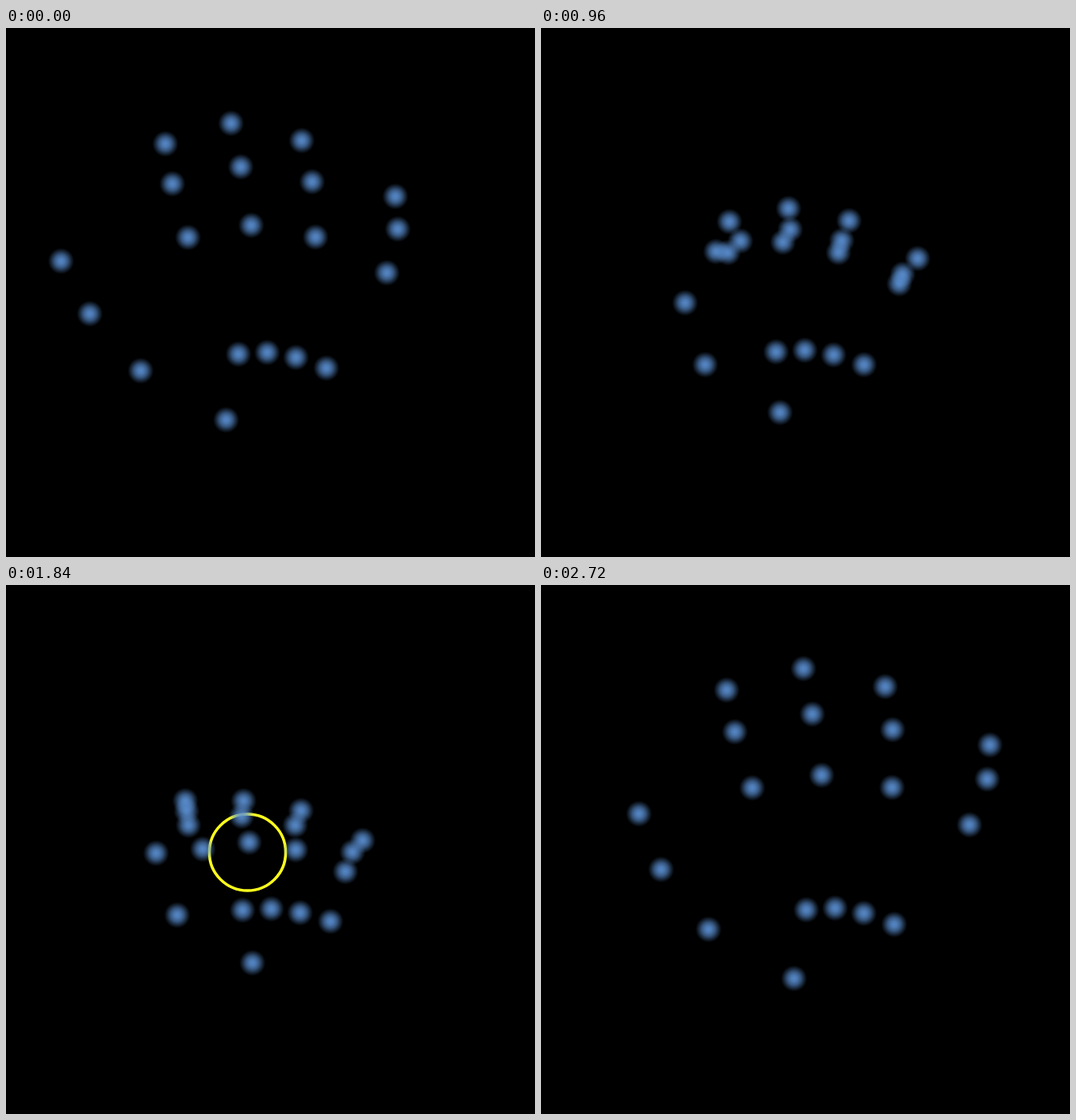
Animation, 644 px wide and 644 px high, one loop 2800 ms. Source, as an HTML page with a canvas:

```html
<!DOCTYPE html>
<html lang="en">
<head>
<meta charset="utf-8">
<title>Hand joints</title>
<style>
html, body { margin: 0; height: 100%; overflow: hidden; background: #000; }
canvas { display: block; }
</style>
</head>
<body>
<canvas id="stage" width="644" height="644"></canvas>
<script>
const ctx = document.getElementById('stage').getContext('2d');
const LOOP = 2800, STEP = 80, RADIUS = 16;

// Knuckles relative to the wrist, and where each straight finger points.
const fingers = [
  { x: 15, y: -80, aim: -89, length: 256, bow: -12 },
  { x: 50, y: -82, aim: -44, length: 279, bow: 5 },
  { x: 85, y: -76, aim: 7, length: 264, bow: 20 },
  { x: 122, y: -63, aim: 84, length: 209, bow: 27 }
];
// Finger bones as shares of the finger, and their angle in a full fist.
const bones = [
  { share: 0.555, bend: 0.84 }, { share: 0.255, bend: 1.45 }, { share: 0.19, bend: Math.PI }
];
const thumb = [
  { length: 120, shrink: 18, angle: -2.62, bend: 0.07 },
  { length: 93, shrink: 21, angle: -2.3, bend: 0.72 },
  { length: 73, shrink: 0, angle: -2.07, bend: 1.76 }
];

// time, wrist x, wrist y, finger curl, thumb curl, spread, stretch
const keys = [
  [0, 268, 477, 0, 0, 0, 1],
  [800, 280, 481, 0, 0, 0.1, 0.99],
  [960, 291, 468, 0.66, 0.66, -1, 1],
  [1120, 297, 453, 1, 1, -1, 1],
  [1600, 297, 453, 1, 1, -1, 1],
  [1840, 300, 460, 0.9, 0.64, -1, 1],
  [2080, 302, 475, 0, -0.1, 1.2, 1.02],
  [2160, 301, 474, 0, 0, 0.9, 1],
  [2720, 308, 479, 0, 0, 1, 1.045]
];

function handAt(t) {
  const next = keys.findIndex(key => key[0] > t);
  if (next < 0) return keys[keys.length - 1];
  const a = keys[next - 1], b = keys[next];
  const k = (t - a[0]) / (b[0] - a[0]);
  return a.map((v, i) => v + (b[i] - v) * k);
}

function drawFinger({ x, y, aim, length, bow }, index, curl, spread, stretch) {
  const baseX = x - 30 * curl;
  const baseY = y * stretch * (1 - 0.27 * curl ** 3);
  const dx = aim + spread * (13.5 * index - 8);
  const bowing = [1, 0.7 + 0.5 * curl, 0.8 * curl];
  const lean = -29 * curl ** 3;
  const hook = 16 * Math.sin(Math.PI * curl);
  let reach = 0;
  drawDot(baseX, baseY);
  bones.forEach(({ share, bend }, i) => {
    reach += share * Math.cos(bend * curl);
    const side = bow * bowing[i] + lean + (i ? hook : 0);
    drawDot(baseX + dx * reach + side, baseY - length * stretch * reach);
  });
}

function drawThumb(curl, spread) {
  let x = 0, y = 0;
  drawDot(x, y);
  thumb.forEach(({ length, shrink, angle, bend }, i) => {
    const turn = angle + bend * curl + 0.06 * i * spread;
    x += (length - shrink * curl) * Math.cos(turn);
    y += (length - shrink * curl) * Math.sin(turn);
    drawDot(x, y);
  });
}

function drawRing(curl) {
  const open = 1 - curl;
  ctx.beginPath();
  ctx.arc(301 - 70 * open, 331 - 55 * open, 46.5, 0, Math.PI * 2);
  ctx.strokeStyle = '#ffff1e';
  ctx.lineWidth = 3.5;
  ctx.stroke();
}

const glow = ctx.createRadialGradient(0, 0, 0, 0, 0, RADIUS);
[[0, 0.92], [0.25, 0.82], [0.5, 0.6], [0.75, 0.28], [0.9, 0.1], [1, 0]]
  .forEach(([r, a]) => glow.addColorStop(r, `rgba(92, 146, 214, ${a})`));

function drawDot(x, y) {
  ctx.save();
  ctx.translate(x, y);
  ctx.fillStyle = glow;
  ctx.fillRect(-RADIUS, -RADIUS, 2 * RADIUS, 2 * RADIUS);
  ctx.restore();
}

function draw() {
  const t = Math.floor(performance.now() % LOOP / STEP) * STEP;
  const [, x, y, curl, thumbCurl, spread, stretch] = handAt(t);
  ctx.fillStyle = '#000';
  ctx.fillRect(0, 0, 644, 644);
  if (curl > 0.85) drawRing(curl);
  ctx.save();
  ctx.translate(x, y);
  fingers.forEach((finger, i) => drawFinger(finger, i, curl, spread, stretch));
  drawThumb(thumbCurl, spread);
  ctx.restore();
  requestAnimationFrame(draw);
}
draw();
</script>
</body>
</html>
```
